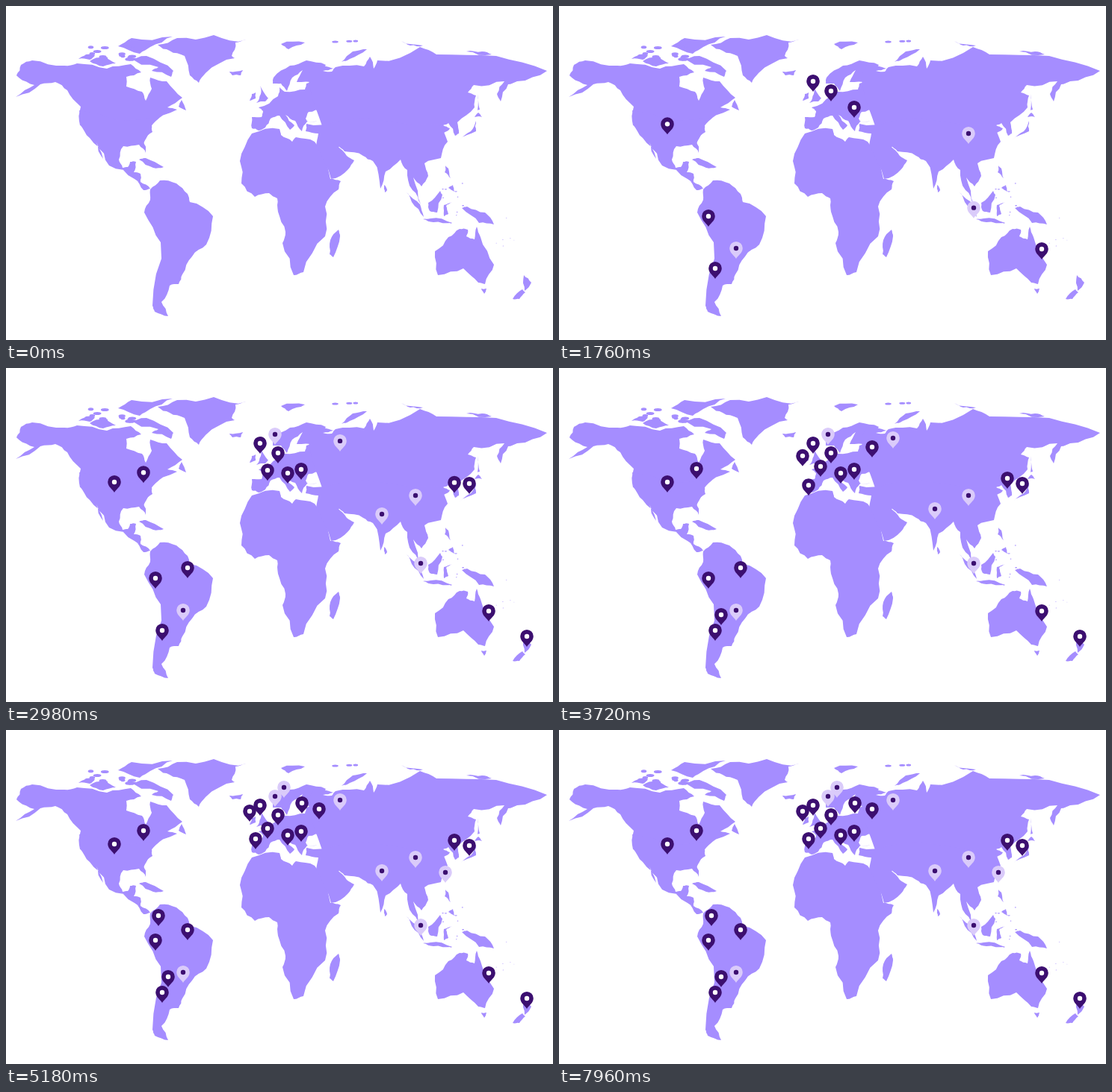
An HTML page that plays this animation: 732 px wide and 448 px high, repeating every 7980 ms.

```html
<!DOCTYPE html>
<html lang="en">
<head>
<meta charset="utf-8">
<title>Pins dropping on a world map</title>
<style>
  html, body { margin: 0; width: 100%; height: 100%; overflow: hidden; background: #fff; }
  svg { display: block; width: 732px; height: 448px; }
  #land { fill: #a58dff; }
  #land .sea { fill: #fff; }
</style>
</head>
<body>
<svg viewBox="0 0 732 448">
  <defs>
    <path id="pin" d="M0 14C-2 10-8.8 6.5-8.8-.2A8.8 8.8 0 1 1 8.8-.2C8.8 6.5 2 10 0 14Z"/>
  </defs>
  <g id="land">
    <!-- North America -->
    <polygon points="14,93 20,79 35,73 78,80 95,77 135,84 167,78 181,89 161,95 161,108 182,115 187,127 195,111 193,96 215,101 236,123 216,136 229,139 195,160 184,184 99,160 100,135 82,113 66,102 46,105 13,122 38,106 17,96"/>
    <polygon points="98,140 205,150 195,160 196,169 184,181 187,197 178,186 157,188 151,206 156,217 163,216 166,209 174,209 171,223 180,225 180,236 193,245 184,247 172,232 138,214 121,183 130,205 112,177 99,159"/>
    <!-- Arctic islands -->
    <polygon points="112,74 130,68 147,77 130,81"/>
    <polygon points="97,71 107,65 119,66 112,72"/>
    <polygon points="150,54 168,43 223,41 193,55 179,64"/>
    <polygon points="160,70 188,67 224,87 221,95 195,87 204,82"/>
    <!-- Greenland, Iceland, Newfoundland, Cuba -->
    <polygon points="203,52 229,43 278,39 322,45 307,49 302,67 306,70 267,90 258,103 246,93 239,67 219,60"/>
    <polygon points="299,88 317,86 314,93 303,93"/>
    <polygon points="231,135 235,126 241,140"/>
    <polygon points="178,206 187,204 211,216 197,217"/>
    <!-- South America -->
    <polygon points="193,246 206,234 228,238 243,252 246,263 277,282 268,320 249,336 236,360 231,373 219,375 208,397 217,416 199,410 196,402 207,317 185,277 193,260"/>
    <!-- Africa and Madagascar -->
    <polygon points="329,171 366,165 368,173 383,182 388,176 413,182 434,232 448,235 445,246 427,269 427,309 398,357 385,361 370,318 374,303 364,276 363,258 352,251 333,256 315,238 313,208"/>
    <polygon points="445,300 447,309 438,337 433,333 434,314"/>
    <!-- Europe -->
    <polygon points="329,164 329,149 342,149 344,141 338,136 364,121 366,109 373,115 400,112 402,104 440,94 440,156 403,155 396,168 387,154 374,146 386,160 380,166 366,147 354,151 347,163 338,167"/>
    <polygon points="357,104 358,96 380,80 402,73 428,79 414,102 389,102 397,86 383,96 376,114 368,104"/>
    <polygon points="340,107 351,124 347,128 335,130 341,118"/>
    <polygon points="329,118 334,116 334,124 326,127"/>
    <polygon class="sea" points="401,151 405,142 424,139 429,153 404,155"/>
    <!-- Asia -->
    <polygon points="412,77 438,84 424,87 436,88 441,82 479,81 487,68 492,84 497,73 554,55 576,65 656,67 724,87 684,101 672,105 662,128 657,118 667,101 626,106 618,116 629,120 627,136 604,156 606,171 601,174 592,157 585,160 594,164 586,170 440,190 405,100"/>
    <polygon points="402,158 440,155 580,160 591,182 582,204 560,211 565,228 556,242 545,230 555,266 544,247 537,220 528,206 508,222 501,245 491,208 478,201 453,195 443,187 456,201 466,207 458,219 435,232 415,188 418,171 401,168"/>
    <!-- Northern islands -->
    <polygon points="368,51 400,49 378,58"/>
    <polygon points="449,75 464,61 483,58 460,71"/>
    <polygon points="529,47 558,53 541,53"/>
    <polygon points="616,61 637,61 650,65"/>
    <!-- Japan and Sakhalin -->
    <polygon points="631,118 634,139 631,140"/>
    <polygon points="627,149 632,143 637,149"/>
    <polygon points="629,154 629,168 606,180 622,168"/>
    <!-- South-east Asia -->
    <polygon points="588,214 592,218 595,231 587,223"/>
    <polygon points="592,244 598,240 600,249"/>
    <polygon points="565,264 581,248 584,253 577,277 567,275"/>
    <polygon points="536,250 554,266 559,283 543,263"/>
    <polygon points="558,286 568,285 597,291 572,290"/>
    <polygon points="586,267 597,263 589,268 592,279 586,282"/>
    <polygon points="610,271 617,269 641,277 653,293 633,291"/>
    <polygon points="506,240 510,247 507,250"/>
    <!-- Australia, Tasmania and New Zealand -->
    <polygon points="574,329 578,361 612,352 632,371 641,373 653,347 635,310 630,296 627,313 616,309 618,300 607,299 592,310"/>
    <polygon points="636,379 643,379 640,386"/>
    <polygon points="693,361 703,371 694,382"/>
    <polygon points="691,380 695,384 687,393 678,393"/>
  </g>
  <g id="pins"></g>
</svg>
<script>
const LOOP = 7980, FALL = 400;
const DARK = '#3c0f70', PALE = '#dacbfa';
const SVG = 'http://www.w3.org/2000/svg';

let seed = 7;
const random = () => (seed = seed * 16807 % 2147483647) / 2147483647;

// Roughens a coast: every edge gets a midpoint pushed sideways.
const roughen = points => points.flatMap(([x, y], i) => {
  const [nextX, nextY] = points[(i + 1) % points.length];
  const push = (random() - .5) * .2;
  return [[x, y], [(x + nextX) / 2 + (nextY - y) * push, (y + nextY) / 2 - (nextX - x) * push]];
});

const land = document.getElementById('land');
for (const shape of land.children) {
  const corners = shape.getAttribute('points').split(' ').map(pair => pair.split(',').map(Number));
  shape.setAttribute('points', roughen(roughen(corners)).join(' '));
}

// Scatters small islets over a box.
function scatter(count, left, top, width, height, size) {
  for (let i = 0; i < count; i++) {
    const islet = document.createElementNS(SVG, 'ellipse');
    islet.setAttribute('cx', left + random() * width);
    islet.setAttribute('cy', top + random() * height);
    islet.setAttribute('rx', size * (.5 + random()));
    islet.setAttribute('ry', size * .5);
    land.append(islet);
  }
}
scatter(16, 108, 53, 65, 22, 4);
scatter(10, 584, 232, 28, 60, 1.3);
scatter(6, 655, 282, 28, 44, .8);
scatter(3, 440, 46, 36, 2, 3);

// Each wave: start time, then pins as [x, y, pale, fall distance].
const waves = [
  [200, [395, 136], [200, 282]],
  [595, [340, 101, 0, 200], [548, 171, 1, 275], [237, 325, 1, 350], [646, 326, 0, 400]],
  [1000, [364, 114], [209, 352]],
  [1410, [145, 153], [555, 262, 1]],
  [1820, [360, 89, 1], [620, 155], [697, 360]],
  [2225, [377, 141], [243, 268]],
  [2633, [350, 132], [184, 135], [447, 94, 1], [600, 148], [503, 189, 1]],
  [3035, [419, 106], [217, 331]],
  [3435, [326, 109], [334, 146]],
  [3835, [372, 77, 1]],
  [4233, [204, 249, 0, 450], [588, 191, 1], [396, 98, 0, 250]]
];

const layer = document.getElementById('pins');
const pins = waves.flatMap(([start, ...group]) =>
  group.map(([x, y, pale = 0, drop = y + 25]) => {
    const node = document.createElementNS(SVG, 'g');
    node.innerHTML = `<use href="#pin" fill="${pale ? PALE : DARK}"/>` +
      `<circle r="3.2" fill="${pale ? DARK : '#fff'}"/>`;
    layer.append(node);
    return { node, start, x, y, drop };
  }));

const bezier = (a, b, u) => 3 * (1 - u) ** 2 * u * a + 3 * (1 - u) * u * u * b + u ** 3;

// Ease out with a slight overshoot: cubic-bezier(.45, 1.45, .8, 1).
function easeOutBack(p) {
  if (p <= 0) return 0;
  if (p >= 1) return 1;
  let low = 0, high = 1;
  for (let i = 0; i < 20; i++) {
    const mid = (low + high) / 2;
    if (bezier(.45, .8, mid) < p) low = mid; else high = mid;
  }
  return bezier(1.45, 1, low);
}

function draw() {
  const time = performance.now() % LOOP;
  for (const { node, start, x, y, drop } of pins) {
    const top = y - drop * (1 - easeOutBack((time - start) / FALL));
    node.setAttribute('transform', `translate(${x} ${top.toFixed(2)})`);
    node.setAttribute('visibility', time < start ? 'hidden' : 'visible');
  }
  requestAnimationFrame(draw);
}
draw();
</script>
</body>
</html>
```
